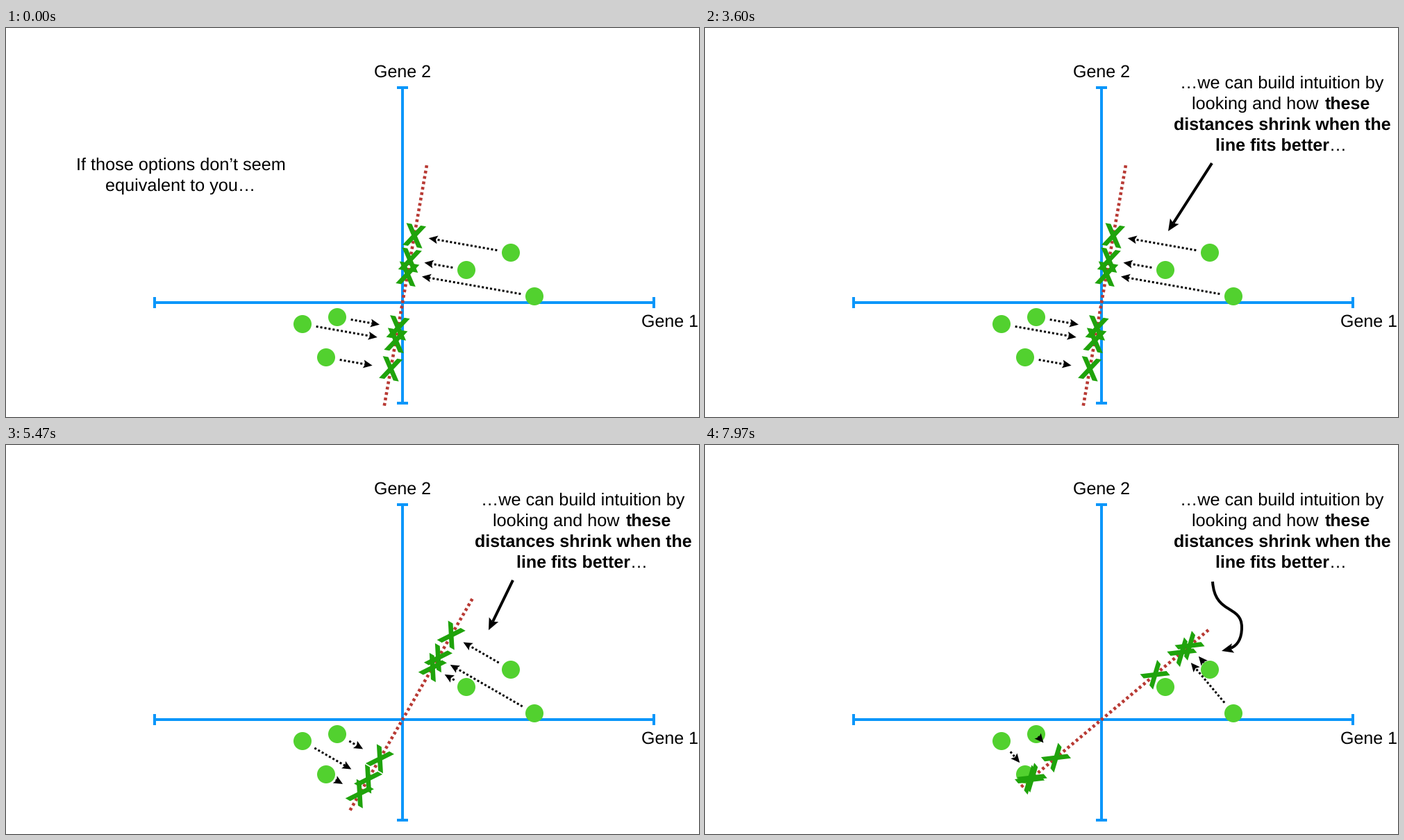
A matplotlib script that plays this animation: 998x561 px, repeating every 8 s.

```python
import numpy as np
import matplotlib.pyplot as plt
from matplotlib.animation import FuncAnimation
from matplotlib.patches import Circle, PathPatch, Polygon
from matplotlib.path import Path

W, H = 998, 561
LOOP, STEP = 8000, 40
PX = 0.72  # points per pixel at 100 dpi
BLUE, RED, GREEN, DARK_GREEN = "#0896fa", "#b83a34", "#52d12f", "#1fa30b"
ORIGIN = np.array([571, 396])
POINTS = [(727, 324), (663, 349), (761, 387), (427, 427), (477, 417), (461, 475)]
TEXT_SWAP = 3540
POINTER_TAIL = (730, 195)

# start time, line angle, sideways shift of the arrows, pointer tip
STAGES = [(0, 80, -3, (667, 293)),
          (4220, 70, 10, (685, 288)),
          (4920, 60, -4, (695, 267)),
          (5640, 40, -4, None)]

plt.rcParams.update({"font.family": "Liberation Sans", "text.hinting": "none"})
fig = plt.figure(figsize=((W + 0.01) / 100, (H + 0.01) / 100), dpi=100, facecolor="white")
ax = fig.add_axes([0, 0, 1, 1])
ax.set_xlim(0, W)
ax.set_ylim(H, 0)
ax.axis("off")


def stroke(a, b, color, width, z, style="-"):
    return ax.plot([a[0], b[0]], [a[1], b[1]], color=color, lw=width * PX, ls=style,
                   solid_capstyle="butt", dash_capstyle="butt", zorder=z)[0]


def shape(corners, color, z):
    return ax.add_patch(Polygon(corners, fc=color, lw=0, zorder=z))


def label(x, y, text, ha="center", weight="normal", size=25):
    return ax.text(x, y, text, fontsize=size * PX, ha=ha, va="baseline",
                   weight=weight, color="black", zorder=8)


def head(tip, direction, length, half_width):
    d = np.array(direction, float)
    d /= np.hypot(*d)
    side = half_width * np.array([-d[1], d[0]])
    back = tip - length * d
    return shape([tip, back + side, tip - 0.8 * length * d, back - side], "black", 7)


def arrow(tail, tip, width, length, half_width, style="-"):
    tail, tip = np.array(tail, float), np.array(tip, float)
    d = (tip - tail) / np.hypot(*(tip - tail))
    return [head(tip, d, length, half_width),
            stroke(tail, tip - 0.8 * length * d, "black", width, 7, style)]


def cross(center, angle):
    tilt = np.radians(90 - angle)
    turn = np.array([[np.cos(tilt), np.sin(tilt)], [-np.sin(tilt), np.cos(tilt)]])
    bar = np.array([(-14.5, 16), (-6.5, 16), (14.5, -16), (6.5, -16)])
    return [shape((bar * [mirror, 1]) @ turn + center, DARK_GREEN, 6) for mirror in (1, -1)]


def distance_arrow(point, foot, shift):
    """Dotted arrow from a point towards its projection, with gaps at both ends."""
    away = point - foot
    dist = np.hypot(*away)
    if dist < 30:
        return []
    away /= dist
    tip_gap = 24 + shift * np.sign(away[0])
    tail_gap = max(dist - 20, tip_gap + 12)
    return arrow(foot + tail_gap * away, foot + tip_gap * away, 3, 13, 6, (0, (1, 1)))


def build_stage(angle, shift):
    rad = np.radians(angle)
    along = np.array([np.cos(rad), -np.sin(rad)])
    parts = [stroke(ORIGIN - 151 * along, ORIGIN + 201 * along, RED, 4.6, 4, (0, (0.86, 0.86)))]
    for point in POINTS:
        foot = ORIGIN + ((point - ORIGIN) @ along) * along
        parts += cross(foot, angle) + distance_arrow(point, foot, shift)
    return parts


def build_pointer(tip):
    if tip:
        return arrow(POINTER_TAIL, tip, 4, 17, 7.5)
    knots = [(731, 197), (734, 245), (773, 230), (773, 263), (773, 279), (767, 289), (757, 293)]
    path = Path(knots, [Path.MOVETO] + [Path.CURVE4] * 6)
    curve = ax.add_patch(PathPatch(path, fc="none", ec="black", lw=4 * PX,
                                   capstyle="butt", zorder=7))
    return [curve, head((744, 297), (-16, 4), 17, 7)]


def axis_line(a, b, cap):
    stroke(a, b, BLUE, 4, 2)
    for end in (a, b):
        stroke(np.subtract(end, cap), np.add(end, cap), BLUE, 4, 2)


axis_line((571, 86), (571, 541), (8, 0))
axis_line((214, 396), (933, 396), (0, 8))
label(571.5, 70.5, "Gene 2")
label(956, 430.5, "Gene 1")
for p in POINTS:
    ax.add_patch(Circle(p, 13, fc=GREEN, lw=0, zorder=5))

question = [label(251.5, 204.5, "If those options don’t seem", size=25.3),
            label(251, 234.5, "equivalent to you…", size=25.3)]
answer = [label(831, 86.5, "…we can build intuition by", size=25.3),
          label(701, 116.5, "looking and how", "left", size=25.3),
          label(893, 116.5, "these", "left", "bold"),
          label(831, 146.5, "distances shrink when the", weight="bold"),
          label(735, 176.5, "line fits better", "left", "bold"),
          label(899, 176.5, "…", "left")]
stages = [build_stage(angle, shift) for _, angle, shift, _ in STAGES]
pointers = [build_pointer(tip) for *_, tip in STAGES]


def show(parts, visible):
    for part in parts:
        part.set_visible(visible)


def update(frame):
    t = frame * STEP
    current = sum(t >= stage[0] for stage in STAGES) - 1
    swapped = t >= TEXT_SWAP
    show(question, not swapped)
    show(answer, swapped)
    for i, (stage, pointer) in enumerate(zip(stages, pointers)):
        show(stage, i == current)
        show(pointer, swapped and i == current)
    return []


anim = FuncAnimation(fig, update, frames=LOOP // STEP, interval=STEP,
                     repeat=True, repeat_delay=0)
plt.show()
```
